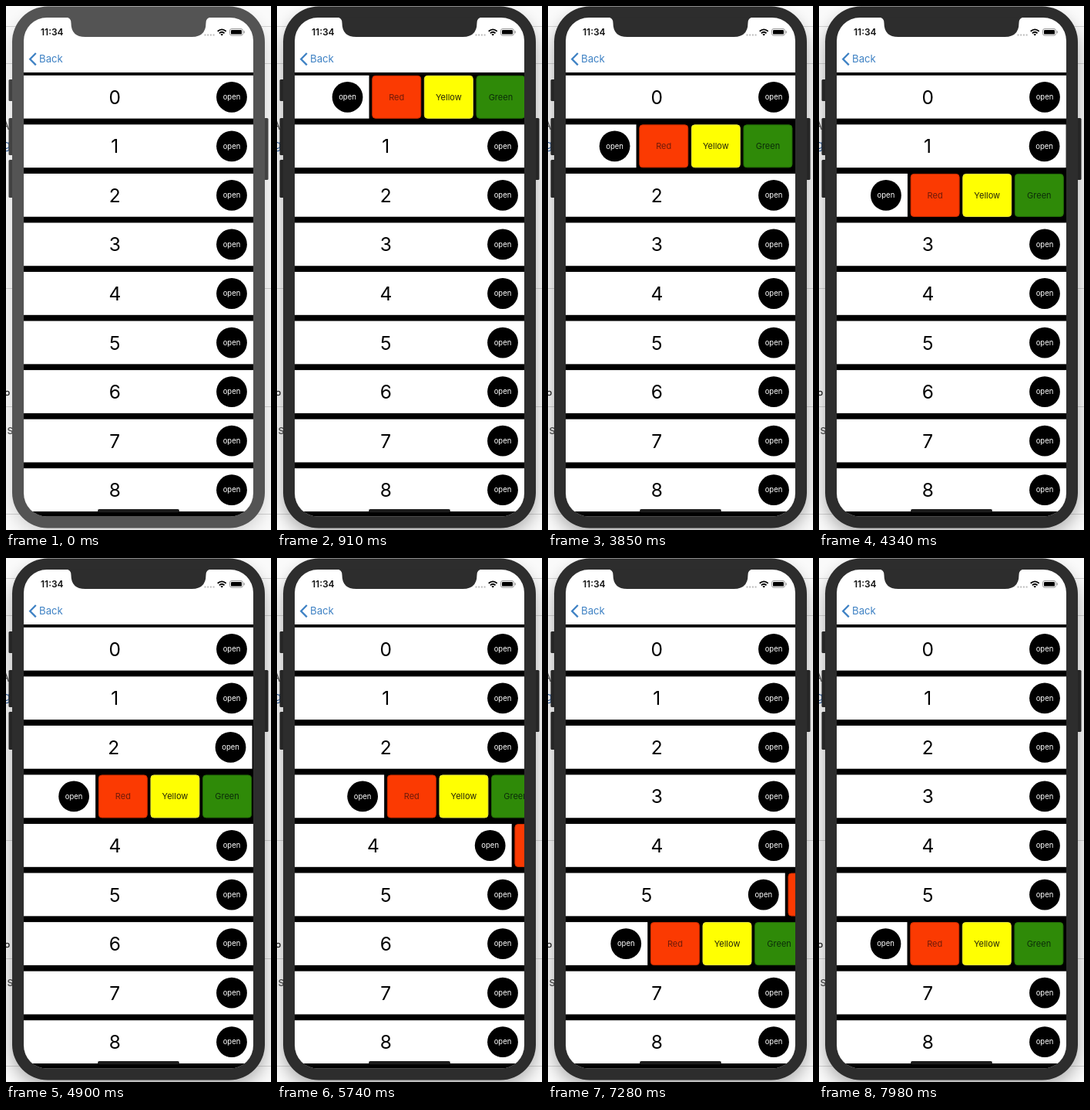
An HTML page that plays this animation: 344 px wide and 678 px high, repeating every 8 s.

```html
<!DOCTYPE html>
<html lang="en">
<head>
<meta charset="utf-8">
<title>Swipeable rows</title>
<style>
  html, body { margin: 0; width: 100%; height: 100%; overflow: hidden; background: #fff; }
  svg { display: block; width: 344px; height: 678px; font-family: Inter, Roboto, sans-serif; }
  .mid { text-anchor: middle; }
</style>
</head>
<body>
<svg viewBox="0 0 344 678" xmlns="http://www.w3.org/2000/svg">
  <defs>
    <clipPath id="screen"><rect x="23" y="15" width="298" height="645.5" rx="30"/></clipPath>
    <filter id="blur" x="-20%" y="-20%" width="140%" height="140%"><feGaussianBlur stdDeviation="11"/></filter>
  </defs>

  <!-- page behind the phone -->
  <rect width="344" height="678" fill="#fafafa"/>
  <path d="M0 26.5H344M0 74.5H344M0 365.5H344M0 518.5H344M0 657.5H344" stroke="#d2d2d2"/>
  <g font-size="16" fill="#505050">
    <text x="-6.5" y="160">A</text>
    <text x="-4" y="185" fill="#3a66a0" text-decoration="underline">g</text>
    <text x="-8.5" y="554">gs</text>
    <circle cx="1.5" cy="501" r="2.6" fill="none" stroke="#333" stroke-width="1.4"/>
  </g>
  <rect id="shadow" x="8" y="12" width="328" height="672" rx="48" filter="url(#blur)"/>

  <!-- phone body -->
  <g id="keys">
    <rect x="3.5" y="95" width="8" height="28" rx="1.5"/>
    <rect x="3.5" y="145" width="8" height="48" rx="1.5"/>
    <rect x="3.5" y="199" width="8" height="49" rx="1.5"/>
    <rect x="332" y="145" width="8.5" height="80" rx="1.5"/>
  </g>
  <rect class="body" x="8" y="0.5" width="328" height="675" rx="46"/>

  <g clip-path="url(#screen)">
    <rect x="23" y="15" width="298" height="646" fill="#fff"/>
    <rect x="23" y="86" width="298" height="575" fill="#000"/>
    <g id="rows"></g>
    <rect x="119" y="651" width="106" height="4.2" rx="2.1" fill="#1c1c1c"/>
  </g>
  <path class="body" d="M78 14.5Q84.500 15 84.500 22Q84.500 40 103 40H241Q259.500 40 259.500 22Q259.500 15 266 14.500Z"/>

  <!-- status and navigation bars -->
  <text x="45" y="38.3" font-size="12" font-weight="600" fill="#111">11:34</text>
  <path d="M257.500 37.500H271" stroke="#bbb" stroke-width="2" stroke-dasharray="2 1.700"/>
  <g fill="none" stroke="#000" stroke-width="1.8">
    <path d="M274.700 32.800Q280.200 28 285.700 32.800M276.900 35.200Q280.200 32.400 283.500 35.200"/>
  </g>
  <path d="M278.400 36.700Q280.200 35.400 282 36.700L280.200 38.600Z"/>
  <rect x="290.500" y="29.500" width="17" height="8.600" rx="2.500" fill="none" stroke="#999"/>
  <rect x="292" y="31" width="14" height="5.600" rx="1.200"/>
  <path d="M309.300 32.300V35.300" stroke="#999" stroke-width="1.200"/>
  <path d="M38.800 61L31.200 68.700L38.800 76.400" fill="none" stroke="#3f82c4" stroke-width="2.300"/>
  <text x="43" y="73.400" font-size="13.200" fill="#3f82c4">Back</text>
</svg>

<script>
const LOOP = 8000, STEP = 70;
const EDGE = 321, REVEAL = 206.5;
const FOCUS_AT = 490;

// Opening and closing time of each row; opening one row closes the one before.
const TAPS = [600, 3260, 3880, 4520, 5708, 6528, 7040];
const OPEN_LAG = 7;
const SCHEDULE = TAPS.map((tap, i) => ({
  open: tap + OPEN_LAG,
  close: i === 0 ? 1580 : TAPS[i + 1] ?? Infinity
}));

const ACTIONS = [
  { label: 'Red', fill: '#fb3a02', edge: '#c92c00', ink: '#6d1a0a' },
  { label: 'Yellow', fill: '#ffff02', edge: '#e4e440', ink: '#24240a' },
  { label: 'Green', fill: '#2f8a08', edge: '#236a08', ink: '#0c2c0a' }
];

const actionMarkup = (a, i, y) => {
  const x = EDGE + 3.7 + i * 67.6;
  return `<rect x="${x + .5}" y="${y + .5}" width="63" height="55" rx="4" fill="${a.fill}" stroke="${a.edge}"/>
    <text class="mid" x="${x + 32}" y="${y + 32}" font-size="11" fill="${a.ink}">${a.label}</text>`;
};

const rowMarkup = i => {
  const y = 89.8 + i * 63.55;
  return `<g><rect x="23" y="${y}" width="298" height="55.8" fill="#fff"/>
    <text class="mid" x="141.3" y="${y + 37}" font-size="24.5" fill="#000">${i}</text>
    <circle cx="293" cy="${y + 28}" r="19.9" fill="#000"/>
    <text class="mid" x="293" y="${y + 31.2}" font-size="9.5" fill="#fff">open</text>
    ${i < TAPS.length ? ACTIONS.map((a, n) => actionMarkup(a, n, y)).join('') : ''}</g>`;
};

const byId = id => document.getElementById(id);
byId('rows').innerHTML = Array.from({ length: 9 }, (_, i) => rowMarkup(i)).join('');
const rows = [...byId('rows').children];
const bodies = document.querySelectorAll('.body');

// Critically damped spring, 0 to 1.
const spring = ms => {
  if (ms <= 0) return 0;
  const u = 0.0185 * ms;
  return 1 - (1 + u) * Math.exp(-u);
};

function render(time) {
  const t = Math.floor((time % LOOP) / STEP) * STEP;
  const focused = t >= FOCUS_AT;
  bodies.forEach(b => b.setAttribute('fill', focused ? '#2d2d2d' : '#545454'));
  byId('keys').setAttribute('fill', focused ? '#262626' : '#424242');
  byId('shadow').setAttribute('opacity', focused ? 0.32 : 0.16);
  SCHEDULE.forEach(({ open, close }, i) => {
    const shift = REVEAL * (spring(t - open) - spring(t - close));
    rows[i].setAttribute('transform', `translate(${-shift.toFixed(2)} 0)`);
  });
}

let start;
function tick(now) {
  start ??= now;
  render(now - start);
  requestAnimationFrame(tick);
}
render(0);
requestAnimationFrame(tick);
</script>
</body>
</html>
```
